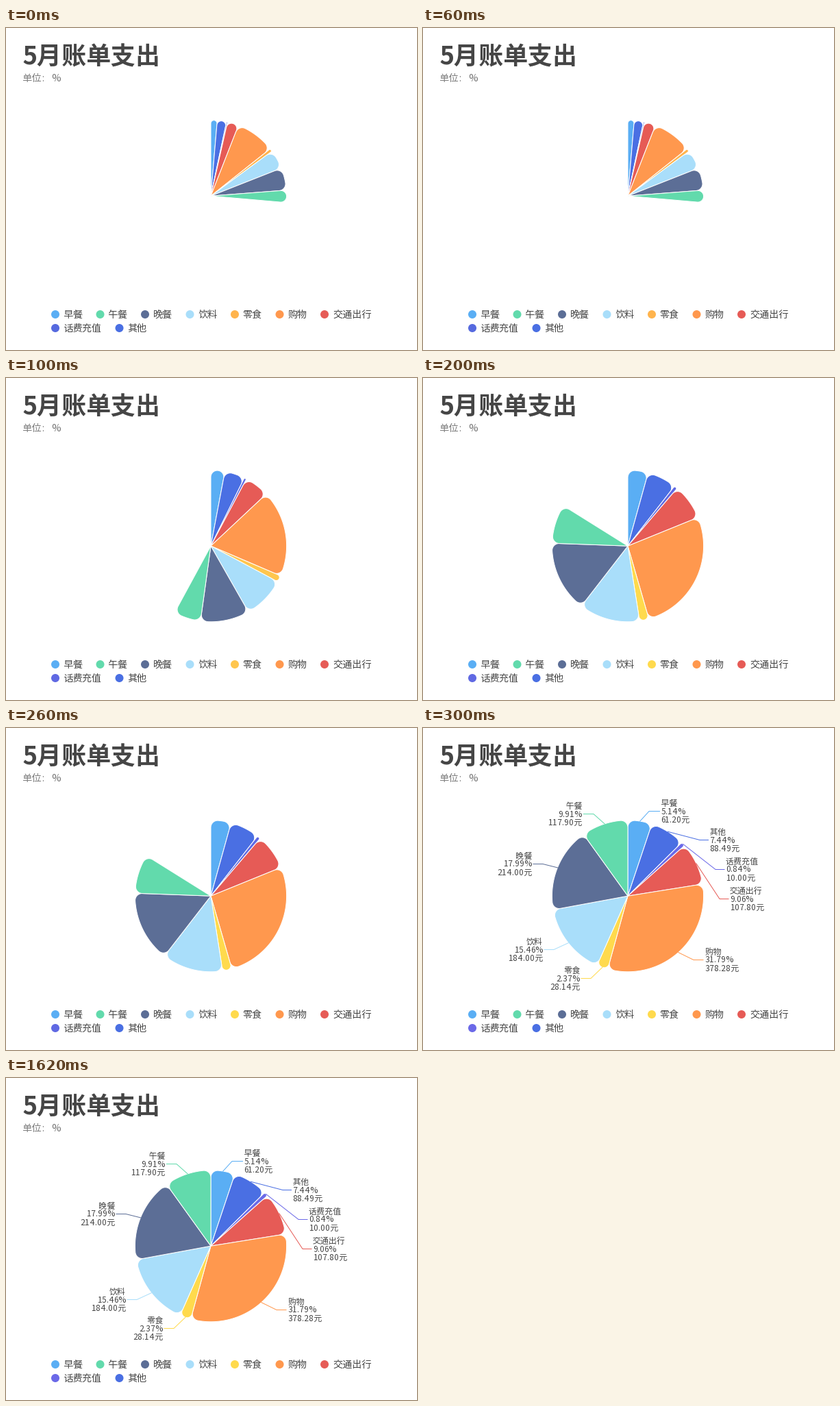
Animation, 600 px wide and 470 px high, one loop 2.5 s. Source, as a matplotlib script:

```python
import numpy as np
import matplotlib.pyplot as plt
from matplotlib.animation import FuncAnimation
from matplotlib.patches import Circle, Polygon

WIDTH, HEIGHT, DPI = 600, 470, 100
CX, CY, RADIUS, CORNER = 299, 245.2, 110.6, 10
FRAME_MS, FRAMES = 100, 25
SWEEPS = (95, 208.5, 302, 360)
SNACK_TINTS = ("#ffb44d", "#ffc64e", "#ffda4d", "#ffda4d")
PHONE_TINTS = ("#566adf", "#6069e3", "#6069e3", "#6b69e8")

plt.rcParams["font.family"] = "Noto Sans CJK JP"
plt.rcParams["text.hinting_factor"] = 1  # whole-pixel glyph advances

# name, percent, amount, colour, label elbow x, y, text x
SLICES = [
    ("早餐", 5.14, 61.20, "#5aaef4", 330, 121.5, 347.5),
    ("其他", 7.44, 88.49, "#4a6fe3", 404, 163.5, 418.5),
    ("话费充值", 0.84, 10.00, PHONE_TINTS[-1], 427, 206.5, 442),
    ("交通出行", 9.06, 107.80, "#e65b56", 433, 249.5, 448),
    ("购物", 31.79, 378.28, "#ff984e", 395, 338.5, 411),
    ("零食", 2.37, 28.14, SNACK_TINTS[-1], 245, 365.5, 229),
    ("饮料", 15.46, 184.00, "#a9defa", 191, 323.5, 175),
    ("晚餐", 17.99, 214.00, "#5c6e96", 175, 198.5, 159),
    ("午餐", 9.91, 117.90, "#62daac", 249, 125.5, 232.5),
]
COLORS = {s[0]: s[3] for s in SLICES}
LEGEND = [["早餐", "午餐", "晚餐", "饮料", "零食", "购物", "交通出行"],
          ["话费充值", "其他"]]

fig = plt.figure(figsize=(WIDTH / DPI, HEIGHT / DPI), dpi=DPI, facecolor="white")
ax = fig.add_axes([0, 0, 1, 1])
ax.set_xlim(0, WIDTH)
ax.set_ylim(HEIGHT, 0)
ax.axis("off")


def px(size):
    return size * 72 / DPI


def write(x, y, text, size, color="#464646", **kw):
    return ax.text(x, y, text, fontsize=px(size), color=color,
                   va="baseline", **kw)


def polar(angle, radius):
    """Point at a clockwise angle from twelve o'clock."""
    return np.stack([CX + radius * np.sin(angle),
                     CY - radius * np.cos(angle)], axis=-1)


def rounded_sector(start, end):
    """Outline of a sector whose outer corners are rounded."""
    s = np.sin((end - start) / 2)
    r = min(CORNER, RADIUS * s / (1 + s))
    inset = np.arcsin(r / (RADIUS - r))

    def corner(center_angle, first, last):
        turn = np.linspace(first, last, 16)
        offset = np.stack([np.sin(turn), -np.cos(turn)], axis=-1)
        return polar(center_angle, RADIUS - r) + r * offset

    a, b = start + inset, end - inset
    return np.vstack([[(CX, CY)],
                      corner(a, start - np.pi / 2, a),
                      polar(np.linspace(a, b, 60), RADIUS),
                      corner(b, b, end + np.pi / 2)])


write(24, 53, "5月账单支出", 36, weight="bold")
for x, part in ((24, "单位"), (52, ":"), (66, "%")):
    write(x, 78, part, 14, "#7c7c7c")

dots = {}
for row, names in enumerate(LEGEND):
    y = 418 + 20 * row
    x = 72
    for name in names:
        dots[name] = ax.add_patch(Circle((x, y), 6, fc=COLORS[name], lw=0))
        write(x + 12, y + 5.2, name, 14)
        x += 37.5 + 14 * len(name)

wedges = {name: ax.add_patch(Polygon([(CX, CY)] * 3, fc=color, ec="white",
                                     lw=px(1), joinstyle="bevel"))
          for name, _, _, color, *_ in SLICES}

shares = np.array([s[1] for s in SLICES])
bounds = np.concatenate([[0], np.cumsum(shares)]) / shares.sum()

labels = []
for (name, pct, amount, color, ex, ey, tx), lo, hi in zip(SLICES, bounds, bounds[1:]):
    right = tx > CX
    x0, y0 = polar(np.pi * (lo + hi), RADIUS)
    labels += ax.plot([x0, ex, tx - 2 if right else tx + 2], [y0, ey, ey],
                      color=color, lw=px(1), zorder=3)
    for i, line in enumerate((name, f"{pct:.2f}%", f"{amount:.2f}元")):
        labels.append(write(tx, ey + 4 + 12 * (i - 1), line, 12,
                            ha="left" if right else "right"))


def update(frame):
    step = min(frame, len(SWEEPS) - 1)
    angles = bounds * np.radians(SWEEPS[step])
    for wedge, start, end in zip(wedges.values(), angles, angles[1:]):
        wedge.set_xy(rounded_sector(start, end))
    for name, tints in (("零食", SNACK_TINTS), ("话费充值", PHONE_TINTS)):
        wedges[name].set_facecolor(tints[step])
        dots[name].set_facecolor(tints[step])
    for label in labels:
        label.set_visible(step == len(SWEEPS) - 1)
    return [*wedges.values(), *dots.values(), *labels]


anim = FuncAnimation(fig, update, frames=FRAMES, interval=FRAME_MS,
                     repeat=True, repeat_delay=0, blit=False)
plt.show()
```
